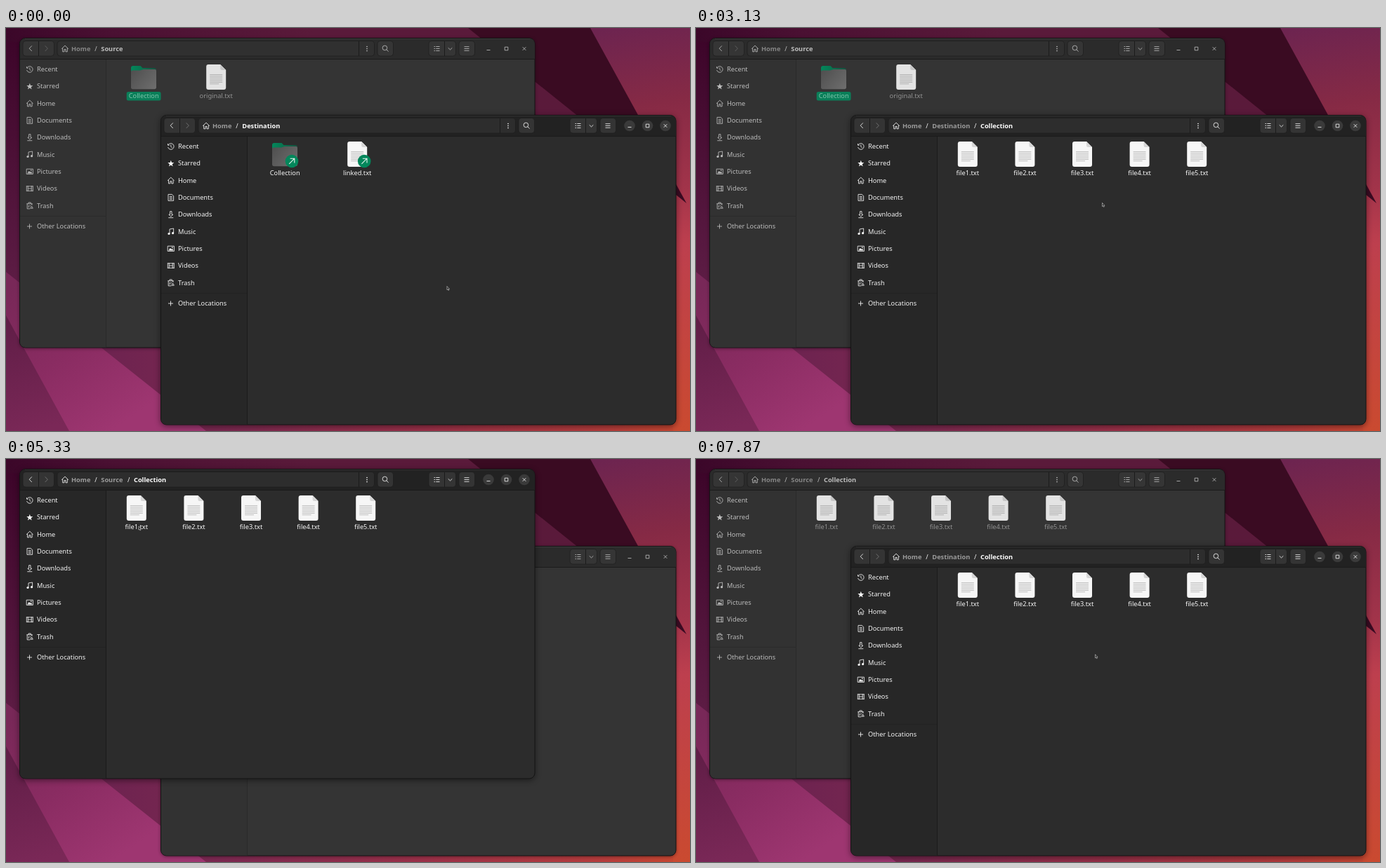
An HTML page that plays this animation: 974 px wide and 575 px high, repeating every 8000 ms.

```html
<!DOCTYPE html>
<html lang="en">
<head>
<meta charset="utf-8">
<title>File windows</title>
<style>
html, body { margin: 0; width: 100%; height: 100%; overflow: hidden; background: #521735; }
svg { display: block; width: 100vw; height: 100vh; }
text { font: 9.25px "Noto Sans", "Open Sans", sans-serif; white-space: pre; }
.win { --head: #2b2b2b; --side: #323232; --body: #343434; --btn: #353535; --path: #303030; --rule: #2a2a2a;
  --ink: #bcbcbc; --label: #929292; --now: #bdbdbd; --past: #858585; --round: transparent; --file: .9;
  --shadow: 0 1px 2px #0006; }
.win.on { --head: #222; --side: #272727; --body: #2c2c2c; --btn: #343434; --path: #2d2d2d; --rule: #1b1b1b;
  --ink: #f4f4f4; --label: #f7f7f7; --now: #fff; --past: #9b9b9b; --round: #3a3a3a; --file: 1;
  --shadow: 0 2px 4px #0007; }
.frame { fill: var(--body); stroke: #151515; filter: drop-shadow(var(--shadow)); }
.head { fill: var(--head); }
.side { fill: var(--side); }
.btn { fill: var(--btn); stroke: #1d1d1d; stroke-width: .7; }
.path { fill: var(--path); stroke: #1d1d1d; stroke-width: .7; }
.edge { stroke: #1b1b1b; }
.rule { stroke: var(--rule); }
.icon { fill: none; stroke: var(--ink); stroke-width: .85; }
.icon .solid { fill: var(--ink); stroke: none; }
.faint { opacity: .35; }
.round { fill: var(--round); }
.ink { fill: var(--ink); }
.crumb { font-weight: 700; fill: var(--past); }
.label { fill: var(--label); text-anchor: middle; }
.things { opacity: var(--file); }
.inside, .open .outside, .pill, .glow { display: none; }
.open .inside, .sel .pill, .hover .glow { display: inline; }
.outside .crumb, .inside .now { fill: var(--now); }
.pill { fill: #0a7f59; }
.sel .folder .label { fill: #7fc4ac; }
.sel.on .folder .label { fill: #fff; }
</style>
</head>
<body>
<svg id="stage" viewBox="0 0 974 575" preserveAspectRatio="none"></svg>
<script>
const line = (d, extra = '') => `<path d="${d}" ${extra}/>`;
const rect = (x, y, w, h, cls, r = 0) =>
  `<rect x="${x}" y="${y}" width="${w}" height="${h}" rx="${r}" class="${cls}"/>`;
const text = (x, y, s, cls) => `<text x="${x}" y="${y}" class="${cls}">${s}</text>`;
const icon = (x, y, body, cls = '') =>
  `<g class="icon ${cls}" transform="translate(${x} ${y})">${body}</g>`;
const grad = (id, dir, ...stops) => `<linearGradient id="${id}" gradientUnits="userSpaceOnUse" ${dir}>` +
  stops.map(([at, c]) => `<stop offset="${at}" stop-color="${c}"/>`).join('') + '</linearGradient>';

const house = line('M-4.8.2 0-4.4 4.8.2M-3.3-.8V4.3H-1V1H1V4.3H3.3V-.8');
const leftArrow = line('M1.8-3.8-1.8 0 1.8 3.8');
const rightArrow = line('M-1.8-3.8 1.8 0-1.8 3.8');
const downArrow = line('M-2.8-1.2 0 1.5 2.8-1.2');

const places = [
  ['Recent', line('M-3.6-2.4A4.3 4.3 0 1 1-4.2 1M-4.3-4V-1.8H-2M0-2.5V.4L1.8 1.6')],
  ['Starred', line('M0-4.6 1.2-1.4 4.5-1.3 1.9.9 2.8 4.1 0 2.3-2.8 4.1-1.9.9-4.5-1.3-1.2-1.4Z', 'class="solid"')],
  ['Home', house],
  ['Documents', line('M-3.8-4.5H1.5L3.8-2.2V4.5H-3.8ZM-2-1.5H2M-2 .5H2M-2 2.5H2')],
  ['Downloads', line('M-1.2-4.5H1.2V0H3L0 2.8-3 0H-1.2ZM-3.5 4.5H3.5')],
  ['Music', line('M-1.8 3V-3.5L3.8-4.5V2') +
    '<circle class="solid" cx="-2.8" cy="3" r="1.6"/><circle class="solid" cx="2.8" cy="2.2" r="1.6"/>'],
  ['Pictures', line('M-4.6-3.6H4.6V3.6H-4.6Z') + line('M-3.4 2.6-1-1 .6 1 2 0 3.6 2.6Z', 'class="solid"') +
    '<circle class="solid" cx="2" cy="-1.7" r=".9"/>'],
  ['Videos', line('M-4.5-4V4M4.5-4V4M-2.5-4V4M2.5-4V4M-4.5-3.3H4.5M-4.5 3.3H4.5M-2.5 0H2.5')],
  ['Trash', line('M-4.5-2.6H4M-1.8-2.6V-4.4H1.5V-2.6M-3.6-2.6V4.5H.5M3-2.6V-.5M-1.5-.5V2.8M.6-.5V1M1 3.8 2.7.8 4.5 3.8Z')],
];

const header = () =>
  rect(24, 18.5, 44.5, 21.5, 'btn', 4) + line('M46.5 19V40', 'class="edge"') +
  icon(35, 29.2, leftArrow) + icon(57.5, 29.2, rightArrow, 'faint') +
  rect(73, 18.5, 451.5, 21.5, 'path', 4) + line('M502.5 19V40', 'class="edge"') +
  icon(514, 29.5, [-3, 0, 3].map(y => `<circle class="solid" cy="${y}" r=".85"/>`).join('')) +
  rect(529, 18.5, 22.5, 21.5, 'btn', 4) + icon(540, 29, '<circle cx="-.6" cy="-.6" r="3.3"/>' + line('M1.8 1.8 4.6 4.6')) +
  rect(602, 18.5, 38.5, 21.5, 'btn', 4) + line('M624.5 19V40', 'class="edge"') +
  icon(613.5, 29.5, line('M-4-3H-2.4M-4 0H-2.4M-4 3H-2.4M-1.2-3H4M-1.2 0H4M-1.2 3H4')) +
  icon(632.5, 29.5, downArrow) +
  rect(645, 18.5, 22.5, 21.5, 'btn', 4) + icon(656, 29.5, line('M-3.5-2.8H3.5M-3.5 0H3.5M-3.5 2.8H3.5')) +
  [687, 712.5, 738].map(x => `<circle class="round" cx="${x}" cy="29.5" r="7.8"/>`).join('') +
  icon(687, 29.5, line('M-2.5 2H2.5')) + icon(712.5, 29.5, line('M-2.3-2.3H2.3V2.3H-2.3Z')) +
  icon(738, 29.5, line('M-2.3-2.3 2.3 2.3M2.3-2.3-2.3 2.3'));

const sidebar = () => places.map(([name, shape], i) => {
  const y = 58.7 + 24.3 * i;
  return icon(33.8, y + .3, shape) + text(44, y + 3.4, name, 'ink');
}).join('') + line('M20 268.5H142', 'stroke="#0002"') +
  icon(33.5, 283, line('M-3.5 0H3.5M0-3.5V3.5')) + text(44, 286.3, 'Other Locations', 'ink');

const emblem = (x, y) => `<g transform="translate(${x} ${y})"><circle r="9.3" fill="#03875b"/>` +
  line('M-3.8 3.8 3.6-3.6M-2.4-3.8H3.8V2.4', 'fill="none" stroke="#e8f5f0" stroke-width="1.1"') + '</g>';

const file = (x, name, link) => `<g transform="translate(${x} 0)"><g class="things">` +
  line('M-11 52H6L14 60V85a3 3 0 0 1-3 3H-11a3 3 0 0 1-3-3V55a3 3 0 0 1 3-3Z', 'fill="#f6f6f6"') +
  line('M6 52V57.8a2.2 2.2 0 0 0 2.2 2.2H14Z', 'fill="#d6d6d6"') +
  line([0, 1, 2, 3, 4, 5, 6].map(i => `M-9 ${66.5 + 2.2 * i}H${i == 6 ? 4 : 9}`).join(''), 'stroke="#b2b2b2" stroke-width=".8"') +
  `</g>${link ? emblem(10, 80) : ''}${text(0, 100.2, name, 'label')}</g>`;

const folderFront = 'M178 62.5a2 2 0 0 1 2-2H191L195.5 59H212a2 2 0 0 1 2 2V84.5a2.8 2.8 0 0 1-2.8 2.8H180.8a2.8 2.8 0 0 1-2.8-2.8Z';
const folder = link => '<g class="folder">' +
  line('M178 57a3 3 0 0 1 3-3H191.5L194.5 57H211a3 3 0 0 1 3 3V70H178Z', 'fill="url(#tab)"') +
  line(folderFront, 'fill="url(#front)"') + line(folderFront, 'class="glow" fill="#fff" opacity=".2"') +
  (link ? emblem(206, 80) : '') + rect(171.7, 91, 48.8, 12.5, 'pill', 2.5) +
  text(196.2, 100.2, 'Collection', 'label') + '</g>';

function makeWindow(id, x, y, place, slash, fileName, link) {
  const files = [1, 2, 3, 4, 5].map(n => file(104.2 + 81.6 * n, `file${n}.txt`)).join('');
  return `<g id="${id}" transform="translate(${x} ${y})">` +
    rect(19.5, 14.5, 733.5, 441.5, 'frame', 8) +
    line('M20 44V23a8 8 0 0 1 8-8H745a8 8 0 0 1 8 8V44Z', 'class="head"') +
    line('M20 44H142V455.5H28a8 8 0 0 1-8-8Z', 'class="side"') +
    line('M27 15.5H746', 'stroke="#fff" opacity=".07"') +
    line('M142.5 45V455.5', 'class="rule"') + line('M20 44.5H753', 'class="edge"') + header() + sidebar() +
    icon(84, 29.5, house) + text(93, 32.7, 'Home', 'crumb') + text(126.3, 32.7, '/', 'ink') +
    `<g class="outside">${text(135.3, 32.7, place, 'crumb')}${folder(link)}${file(299.2, fileName, link)}</g>` +
    `<g class="inside">${text(135.3, 32.7, place, 'crumb')}${text(slash, 32.7, '/', 'ink')}` +
    `${text(slash + 9, 32.7, 'Collection', 'crumb now')}${files}</g></g>`;
}

const stage = document.getElementById('stage');
stage.innerHTML = '<defs>' +
  grad('sky', 'x1="0" y1="0" x2="974" y2="0"', [0, '#3b0729'], [.15, '#4a1032'], [.45, '#5a1a3a'], [1, '#5a1a3b']) +
  grad('left', 'x1="0" y1="0" x2="0" y2="575"', [0, '#3b0428'], [.6, '#5b1b43'], [1, '#782653']) +
  grad('low', 'x1="137" y1="0" x2="974" y2="0"', [0, '#6d2350'], [.2, '#7a2850'], [.55, '#9a3048'], [.85, '#b53c3c'], [1, '#c9482f']) +
  grad('right', 'x1="860" y1="0" x2="960" y2="575"', [0, '#6d2450'], [.2, '#862a45'], [.42, '#a2344a'], [.55, '#bd3f4e'], [1, '#ca4a30']) +
  grad('rose', 'x1="10" y1="370" x2="150" y2="575"', [0, '#782858'], [.5, '#8a2c62'], [1, '#9e3671']) +
  grad('plum', 'x1="0" y1="410" x2="40" y2="575"', [0, '#5f1d46'], [1, '#7a2857']) +
  grad('tab', 'x1="178" y1="0" x2="214" y2="0"', [0, '#03875b'], [.4, '#087550'], [1, '#174f3e']) +
  grad('front', 'x1="180" y1="60" x2="212" y2="87"', [0, '#505050'], [1, '#6d6d6d']) + '</defs>' +
  '<rect width="974" height="575" fill="url(#sky)"/>' +
  line('M0 20H100V575H0Z', 'fill="url(#left)"') +
  line('M100 420H974V575H100Z', 'fill="url(#low)"') +
  line('M832 0H974V575H950V250Z', 'fill="url(#right)"') +
  line('M658 0H832L969 250Z', 'fill="#3a0b22"') +
  line('M0 348 285 575H0Z', 'fill="url(#rose)"') +
  line('M0 410 90 575H0Z', 'fill="url(#plum)"') +
  '<g id="desk">' + makeWindow('src', 0, 0, 'Source', 173, 'original.txt', false) +
  makeWindow('dst', 201, 110, 'Destination', 195, 'linked.txt', true) + '</g>' +
  line('M.5.5V5.6L1.6 4.6 2.5 6.4 3.3 6 2.5 4.3H3.9Z', 'id="mouse" fill="#111" stroke="#ddd" stroke-width=".6"');

const [desk, src, dst, mouse] = ['desk', 'src', 'dst', 'mouse'].map(id => document.getElementById(id));

// Pointer path: [tick, x, y], 15 ticks per second
const path = [
  [0, 627.5, 368], [12, 627.5, 368], [24, 396.5, 210], [25, 395, 205], [33, 395, 205],
  [40, 955, 300], [45, 724, 258], [47, 578, 249], [58, 204, 196], [63, 177.5, 161], [65, 177.5, 161],
  [70, 189, 94], [79, 189, 94], [87, 177, 130], [89, 177, 130], [93, 390, 116], [96, 576, 131],
  [102, 817, 309], [106, 817, 309], [115, 576, 273], [118, 568, 278.3], [120, 568, 278.3],
];

const slope = (i, c) => (path[i + 1][c] - path[i][c]) / (path[i + 1][0] - path[i][0]);
function tangent(i, c) {
  if (!i || i == path.length - 1) return 0;
  const a = slope(i - 1, c), b = slope(i, c);
  return a * b > 0 ? 2 * a * b / (a + b) : 0;
}
// Monotone cubic through the path points
function pointer(k, c) {
  const i = path.findIndex((p, n) => n == path.length - 2 || k < path[n + 1][0]);
  const [p, q] = [path[i], path[i + 1]], span = q[0] - p[0], u = (k - p[0]) / span;
  const s = u * u * (3 - 2 * u);
  return p[c] + (q[c] - p[c]) * s +
    span * u * (1 - u) * ((1 - u) * tangent(i, c) - u * tangent(i + 1, c));
}

function setState(win, states) {
  win.setAttribute('class', 'win ' + Object.keys(states).filter(s => states[s]).join(' '));
}

function draw(now) {
  const k = Math.floor((now % 8000) * .015 + .06);
  const srcOn = k >= 64 && k < 103, top = srcOn ? src : dst;
  setState(src, { on: srcOn, sel: k < 64 || k >= 72, hover: k >= 68 && k < 78, open: k >= 78 });
  setState(dst, { on: !srcOn, sel: k >= 26, hover: k >= 25, open: k >= 33 });
  if (desk.lastChild != top) desk.append(top);
  mouse.setAttribute('transform', `translate(${pointer(k, 1)} ${pointer(k, 2)})`);
  requestAnimationFrame(draw);
}
draw(performance.now());
</script>
</body>
</html>
```
